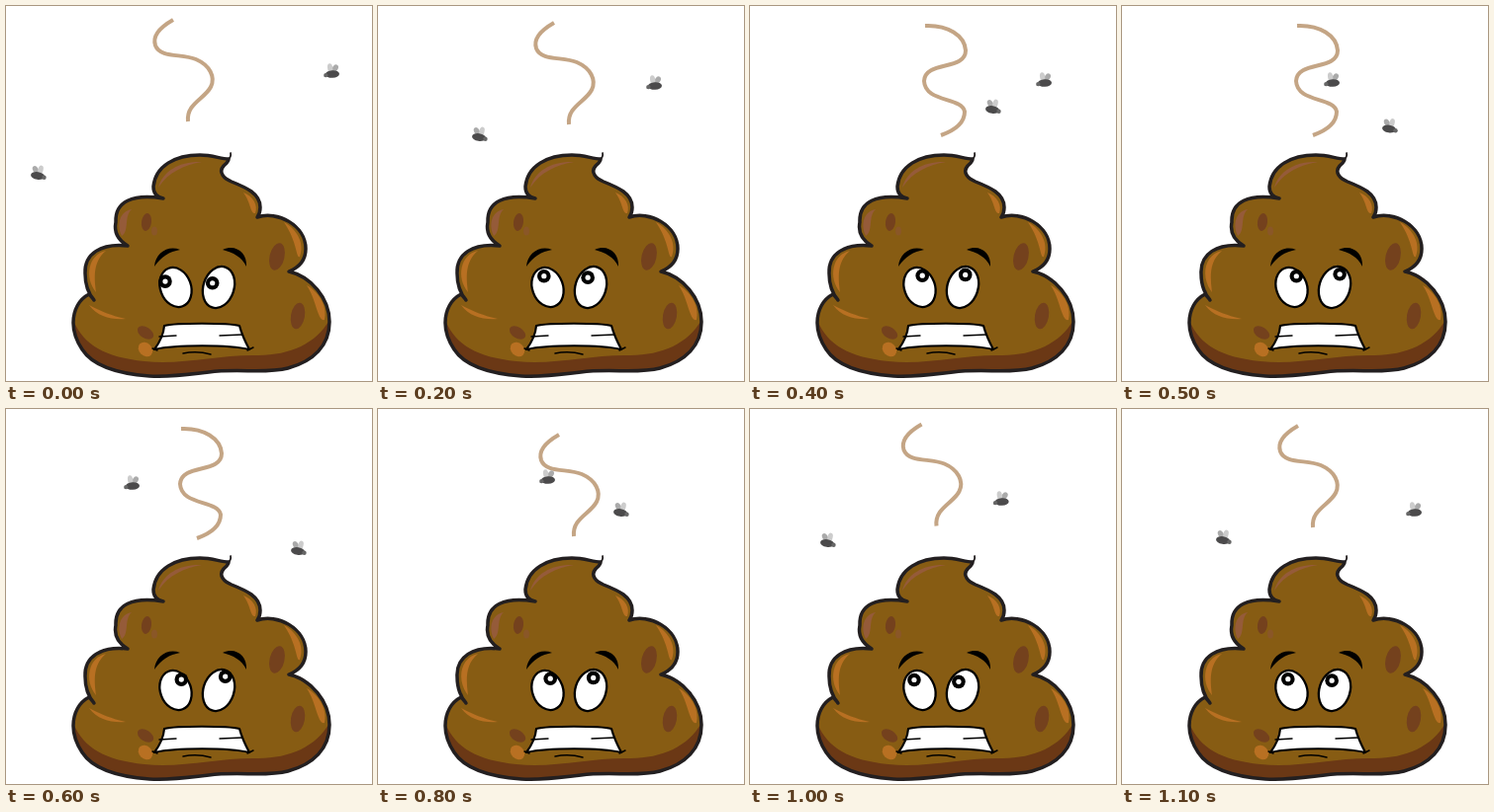
Write an HTML page that moves like this. It is 370 px wide and 380 px high and loops after 1.2 s.

```html
<!DOCTYPE html>
<html lang="en">
<head>
<meta charset="utf-8">
<title>Worried pile</title>
<style>
html, body { margin: 0; width: 100%; height: 100%; overflow: hidden; background: #fff; }
svg { display: block; width: 100vw; height: 100vh; }
</style>
</head>
<body>
<svg viewBox="0 0 370 380" fill="none" stroke-linecap="round" stroke-linejoin="round">
  <defs>
    <path id="shape" d="M225 155C225 158 222 160 220 162C214 169 221 175 228 178C243 184 257 190 257 204Q257 210 254 214C274 207 303 222 303 246C303 258 296 265 286 269C308 274 327 296 327 320C327 344 311 360 285 367C262 373 235 367 205 371C180 374 163 376 145 375C105 372 86 362 77 348C71 339 68 330 68 321C68 308 74 297 84 292L89 298C82 290 80 281 80 271C79 251 96 240 123 243C113 237 109 229 111 219C110 198 128 190 159 195Q149 193 149 183C151 162 171 151 196 151C209 151 217 155 225 155Z"/>
    <clipPath id="inside"><use href="#shape"/></clipPath>
    <g id="fly">
      <ellipse cx="-2" cy="-6" rx="2.8" ry="4.2" transform="rotate(-28 -2 -6)" fill="#aaa"/>
      <ellipse cx="3" cy="-6" rx="2.6" ry="4.5" transform="rotate(15 3 -6)" fill="#ccc"/>
      <ellipse rx="7" ry="3.8" transform="rotate(9)" fill="#4b4a4b"/>
      <circle cx="6.5" cy="1.8" r="2.2" fill="#666"/>
    </g>
    <g id="pupil">
      <circle r="6.8" fill="#000"/>
      <circle r="2.6" fill="#fff"/>
    </g>
  </defs>
  <g id="scene">
    <use href="#shape" fill="#875c13"/>
    <g clip-path="url(#inside)">
      <path fill="#6b3815" d="M64 306C73 341 95 355 140 360C180 364 215 353 255 354C290 354 318 340 330 312V380H64Z"/>
      <g fill="#b87022">
        <path d="M101 248C83 252 79 275 91 290C89 274 88 259 101 248Z"/>
        <path d="M84 303C93 315 106 318 121 317C107 314 95 309 84 303Z"/>
        <path d="M281 219C295 227 302 241 297 254C293 256 295 240 281 219Z"/>
        <path d="M240 189C250 193 255 202 252 210C247 211 248 200 240 189Z"/>
        <path d="M304 283C318 291 325 306 322 318C315 320 314 298 304 283Z"/>
        <ellipse cx="141" cy="348" rx="8" ry="6.5" transform="rotate(45 141 348)"/>
      </g>
      <g fill="#955b39">
        <path d="M154 184C159 166 177 157 198 158C181 161 164 168 154 184Z"/>
        <path d="M117 233C111 220 116 208 127 206C119 213 125 228 117 233Z"/>
      </g>
      <g fill="#74411d">
        <ellipse cx="142" cy="219" rx="5" ry="9" transform="rotate(8 142 219)"/>
        <ellipse cx="150" cy="228" rx="3" ry="4.5" fill="#8a5727"/>
        <ellipse cx="274" cy="254" rx="7.5" ry="14" transform="rotate(13 274 254)"/>
        <ellipse cx="295" cy="314" rx="7" ry="13.5" transform="rotate(10 295 314)"/>
        <ellipse cx="141" cy="331" rx="9" ry="5.5" transform="rotate(32 141 331)"/>
      </g>
    </g>
    <g stroke="#231f20">
      <use href="#shape" stroke-width="3.5"/>
      <path stroke-width="1.8" d="M227 149Q228 153 224 156"/>
    </g>

    <g fill="#000">
      <path d="M150 264C151 250 164 242 176 247C165 249 157 254 150 264Z"/>
      <path d="M219 247C232 241 244 250 243 264C238 254 230 250 219 247Z"/>
    </g>
    <g fill="#fff" stroke="#000" stroke-width="2.3">
      <ellipse cx="171.5" cy="285" rx="15.5" ry="20.5" transform="rotate(-20 171.5 285)"/>
      <ellipse cx="215" cy="285" rx="15.5" ry="21.5" transform="rotate(18 215 285)"/>
    </g>
    <use id="left" href="#pupil"/>
    <use id="right" href="#pupil"/>
    <g stroke="#000" stroke-width="2.2">
      <path fill="#fff" d="M160 324C172 321 224 321 236 324Q239 335 246 348C225 343 172 343 150 348Q159 336 160 324Z"/>
      <path stroke-width="1.4" d="M155 335L172 334M216 334L239 333M148 347L153 349M244 349L250 346M179 352Q193 349 207 353"/>
    </g>

    <g stroke="#c4a585" stroke-width="4" stroke-linecap="butt">
      <path id="wisp" d="M169 14C155 22 148 31 151 40C156 53 178 48 192 54C206 60 212 72 207 82C201 94 182 99 184 117"/>
      <path id="curl" d="M177 20C200 19 217 30 218 45C218 66 177 55 176 76C177 98 214 92 217 107C217 118 207 126 193 131"/>
    </g>
    <use id="flyA" href="#fly"/>
    <use id="flyB" href="#fly"/>
  </g>
</svg>
<script>
const $ = id => document.getElementById(id);
const STEP = 100, STEPS = 12, HOP = 9;

// Key points as [time, x, y], joined by straight lines
const pathA = [[0, 32, 172], [1, 54, 139], [2, 102, 133], [4, 245, 105], [6, 295, 144]];
const pathB = [[0, 330, 69], [2, 280, 81], [4, 298, 78], [6, 128, 78], [8, 172, 72], [11, 296, 105]];
const drift = [[1, 0, 0], [2, 9, 3], [3, 14, 12]];

function along(keys, t) {
  const last = keys.length - 1;
  t = Math.min(Math.max(t, keys[0][0]), keys[last][0]);
  const i = Math.max(1, keys.findIndex(key => key[0] >= t));
  const [t0, x0, y0] = keys[i - 1], [t1, x1, y1] = keys[i];
  const p = (t - t0) / (t1 - t0);
  return [x0 + (x1 - x0) * p, y0 + (y1 - y0) * p];
}

function place(id, [x, y], extra = '') {
  $(id).setAttribute('transform', `translate(${x} ${y}) ${extra}`);
}

function show(id, visible) {
  $(id).style.display = visible ? '' : 'none';
}

function look(id, x, y, angle, reach) {
  place(id, [x + reach * Math.cos(angle), y + reach * Math.sin(angle)]);
}

function draw(now) {
  const k = Math.floor(now / STEP) % STEPS;
  // Fly A goes out and back, then sets off again at half speed
  const u = k < HOP ? 6 - Math.abs(6 - k) : (k - 7) / 2;
  const curled = k >= 4 && k < 8;

  place('scene', [0, k === HOP ? -3 : 0]);
  place('flyA', along(pathA, u));
  place('flyB', along(pathB, k), 'scale(-1 1) rotate(-6)');
  show('flyB', k !== HOP);
  place('wisp', along(drift, u));
  show('wisp', !curled);
  show('curl', curled);

  // The eyes follow fly A
  const turn = 1 - (1 - u / 6) ** 1.6;
  const angle = (-148 + 82 * turn) * Math.PI / 180;
  look('left', 172, 286, angle, 13);
  look('right', 215.5, 285, angle, 8 + 1.2 * u);
}

const start = performance.now();
function tick() {
  draw(performance.now() - start);
  requestAnimationFrame(tick);
}
tick();
</script>
</body>
</html>
```
